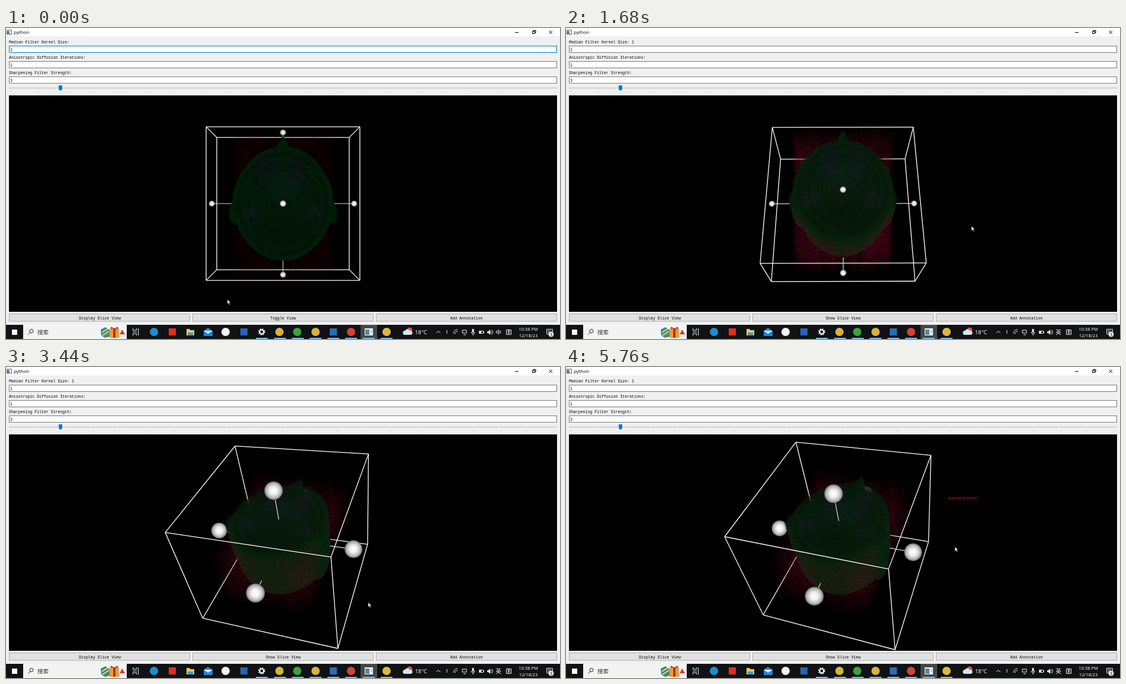
Animation of 936x526 px, one loop 5840 ms. Source, as an HTML page with a canvas:

```html
<!DOCTYPE html>
<html lang="zh">
<head>
<meta charset="utf-8">
<style>
html, body { margin: 0; width: 100%; height: 100%; overflow: hidden; background: #f0f0f0; }
svg, canvas { position: absolute; left: 0; top: 0; }
canvas { left: 5px; top: 114px; }
text { font-family: "Liberation Mono", monospace; font-size: 6.55px; fill: #000; white-space: pre; }
.ui { font-family: "Open Sans", "Noto Sans CJK SC", "Noto Sans CJK", sans-serif; }
.mid { text-anchor: middle; }
.light { fill: #fff; }
</style>
</head>
<body>
<svg width="936" height="526" viewBox="0 0 936 526">
  <rect width="936" height="526" fill="#f0f0f0"/>
  <rect width="936" height="14" fill="#fff"/>
  <rect x="1.5" y="3.5" width="8" height="7" fill="#fff" stroke="#667"/>
  <rect x="2" y="5" width="4" height="5" fill="#4a8a90"/>
  <g id="title">
    <text class="ui" x="13" y="10" style="font-size:8px;fill:inherit">python</text>
    <path d="M860 7.5h6M889.5 5.5h4v4h-4zM891 5.5v-1.500h4v4h-1.500M917.500 4.500l5.500 5.500M923 4.500l-5.500 5.500" fill="none" stroke="currentColor"/>
  </g>
  <text id="median" x="5" y="25.500"></text>
  <text x="5" y="51.500">Anisotropic Diffusion Iterations:</text>
  <text x="5" y="77.500">Sharpening Filter Strength:</text>
  <g fill="#fff" stroke="#7a7a7a">
    <rect id="field" x="5.500" y="30.500" width="925" height="11"/>
    <rect x="5.500" y="56.500" width="925" height="11"/>
    <rect x="5.500" y="82.500" width="925" height="11"/>
  </g>
  <text x="7" y="38.500">1</text><text x="7" y="64.500">1</text><text x="7" y="90.500">3</text>
  <path d="M5 101.500h926" stroke="#d2d2d2" stroke-width="2"/>
  <path id="ticks" stroke="#c4c4c4"/>
  <path d="M89 97h6v6.500l-3 3l-3-3z" fill="#0078d7"/>
  <g id="buttons"></g>
  <rect y="502" width="936" height="24" fill="#101214"/>
  <rect x="10" y="510" width="9" height="9" fill="#fff"/>
  <rect x="29" y="502" width="175" height="24" fill="#f3f3f3"/>
  <g fill="none" stroke="#222"><circle cx="43" cy="512.500" r="3"/><path d="M41 515l-3.500 3.500"/></g>
  <text class="ui" x="53" y="518" style="font-size:9.500px;fill:#333">搜索</text>
  <g>
    <path d="M160 510l8-4l7 5v11l-8 2l-6-4z" fill="#4b8b6a"/><path d="M162 515l11-7M163 520l11-7" stroke="#d8e6c8" stroke-width="1.500"/>
    <rect x="175" y="508" width="16" height="16" fill="#e0a13c"/><path d="M183 508v16" stroke="#b8302c" stroke-width="4"/>
    <path d="M183 508l-6-3v4zl6-3v4z" fill="#c43a32"/>
    <path d="M191 520l5-10l5 8v4h-10z" fill="#c83a3c"/><rect x="191" y="518" width="11" height="4" rx="2" fill="#dfe8f2"/>
  </g>
  <g fill="none" stroke="#eee"><path d="M214.500 508v3h6v-3M214.500 520v-3h6v3M214 514h7M223.500 508v12"/></g>
  <rect x="599" y="502" width="28" height="24" fill="#45484b"/>
  <g id="apps"></g>
  <g fill="none" stroke="#fff"><circle cx="432" cy="514" r="3.400" stroke-width="2"/><circle cx="432" cy="514" r="5" stroke-width="1.800" stroke-dasharray="1.960"/></g>
  <path d="M305 509h5l1 2h7v9h-13z" fill="#f5c64e"/><path d="M307 515h9v5h-9z" fill="#3b9ae0"/>
  <path d="M334 512l7-5l8 5v9h-15z" fill="#2484d8"/><path d="M334 512l7.500 5l7.500-5z" fill="#e9f4fc"/>
  <rect x="606" y="508" width="14" height="12" fill="#f1f5f7"/><rect x="607" y="510" width="7" height="9" fill="#4f8f98"/><path d="M616 512h3M616 515h3" stroke="#789"/>
  <path id="open" stroke="#76b9ed" stroke-width="2"/>
  <circle cx="682" cy="511" r="4.500" fill="#e2503c"/><path d="M674 519a3.500 3.500 0 0 1 0-7a4.500 4.500 0 0 1 8 0a3.500 3.500 0 0 1 2 7z" fill="#d4e5f7"/>
  <text class="ui light" x="691" y="517.500" style="font-size:9.300px">18°C</text>
  <g fill="none" stroke="#e8e8e8">
    <path d="M727 516l3.500-3.500l3.500 3.500M745 511v6M756 517a7 7 0 0 1 7-7M758.500 517.500a4.500 4.500 0 0 1 4.500-4.500M771 511h7v5h-7zM773 519h4M786 514a3 3 0 0 0 6 0M789 517v3M799.500 512.500h7v4h-7zM807.500 513.500v2"/>
    <path d="M818.500 512a3 3 0 0 1 0 5M820.500 510.500a5 5 0 0 1 0 8M845.500 510.500h8v8h-8zM847 513h5M849.500 511v6M847 516h5"/>
    <path d="M913.500 509.500h10v8h-4l-2 2v-2h-4zM915 512h6M915 514.500h5"/>
  </g>
  <path d="M787.500 509h3v6h-3zM813 513h2l3-3v9l-3-3h-2zM800 513h3v3h-3z" fill="#eee"/>
  <text id="lang" class="ui light mid" x="832" y="518" style="font-size:9.500px"></text>
  <text class="ui light mid" x="882.500" y="511.500" style="font-size:7.600px">10:38 PM</text>
  <text class="ui light mid" x="882.500" y="522.500" style="font-size:7.600px">12/18/23</text>
  <circle cx="921" cy="518" r="4.500" fill="#e6e6e6"/><text class="ui mid" x="921" y="520.500">3</text>
</svg>
<canvas id="view" width="926" height="366"></canvas>
<svg width="936" height="526" viewBox="0 0 936 526">
  <text id="note" x="645" y="224" style="font:italic 6.400px 'Liberation Sans',sans-serif;fill:#c01a10">Annotation Demo</text>
  <g id="dialog">
    <rect x="415" y="214" width="106.500" height="70" fill="#f0f0f0"/><rect x="415" y="214" width="106.500" height="18" fill="#fff"/>
    <rect x="419.500" y="219.500" width="8" height="7" fill="#fff" stroke="#667"/><rect x="420" y="221" width="4" height="5" fill="#4a8a90"/>
    <text class="ui" x="432" y="226" style="font-size:7.500px">Text In...</text>
    <text class="ui" x="477" y="226.500" style="font-size:8.500px">?</text>
    <path d="M504 220l6 6M510 220l-6 6" stroke="#222"/>
    <text x="421" y="244.500">Enter your annotation:</text>
    <rect x="421.500" y="249.500" width="93.500" height="11.500" fill="#fff" stroke="#0078d7"/>
    <text id="typed" x="422.500" y="257.500"></text><path id="caret" stroke="#000"/>
    <rect x="421.500" y="265.500" width="44" height="12" fill="#e1e1e1" stroke="#0078d7"/><text class="mid" x="443.500" y="274">OK</text>
    <rect x="470.500" y="265.500" width="44" height="12" fill="#e1e1e1" stroke="#adadad"/><text class="mid" x="492.500" y="274">Cancel</text>
  </g>
  <g id="ime">
    <rect x="435" y="259" width="408" height="27" fill="#d2d2d2"/><rect x="435" y="259" width="49" height="27" fill="#91c9f7"/>
    <rect x="813" y="259" width="30" height="27" fill="#dcdcdc"/>
    <g id="words"></g>
    <path d="M784.500 269l-4 4l4 4" fill="none" stroke="#999"/><path d="M802.500 269l4 4l-4 4" fill="none" stroke="#111"/>
    <g fill="none" stroke="#222"><circle cx="828" cy="273" r="4.800"/><path d="M825.500 274.500q2.500 2.500 5 0M826 271v1M830 271v1"/></g>
  </g>
  <path id="cursor" d="M0 0v8l1.900-1.700l1.300 2.900l1.300-.6l-1.300-2.800h2.500z" fill="#fff" stroke="#000" stroke-width=".6"/>
</svg>
<script>
const LOOP = 5840, STEP = 80, F = 683, H = .176, DEPTH = .0744;
const $ = id => document.getElementById(id);
const ctx = $('view').getContext('2d');
let seed = 7;
const rnd = () => (seed = (seed * 16807) % 2147483647) / 2147483647;

// static parts
$('ticks').setAttribute('d', Array.from({length: 21}, (_, i) => `M${Math.round(8 + i * 45.95) + .5} 107v2`).join(''));
$('open').setAttribute('d', [422, 453, 483, 513, 543, 573, 603, 633].map(x => `M${x} 525h20`).join(''));
$('buttons').innerHTML = ['Display Slice View', '', 'Add Annotation'].map((s, i) =>
  `<rect x="${5.5 + i * 310}" y="483.500" width="305" height="12.500"/><text class="mid" x="${158.5 + i * 309.7}" y="492.500">${s}</text>`).join('');
const btnRects = [...$('buttons').querySelectorAll('rect')];
const toggle = $('buttons').querySelectorAll('text')[1];
const dot = (x, c) => `<circle cx="${x}" cy="514" r="7" fill="${c}"/>`;
const box = (x, c) => `<rect x="${x - 6}" y="508" width="12" height="12" fill="${c}"/>`;
$('apps').innerHTML = dot(250, '#1c8fd0') + box(281, '#e0301e') + dot(371, '#f4f4f4') + box(402, '#2a62b8') +
  dot(462, '#d8b23c') + dot(492, '#3aa33f') + dot(523, '#d8b23c') + box(553, '#2b6cb5') + dot(583, '#d0433a') + dot(643, '#e0b83a');
$('words').innerHTML = ['那你', '奶女', '娜娜', '尿尿', '您能', '你能', '男女'].map((w, i) =>
  `<text class="ui" x="${443 + i * 48.2}" y="277" style="font-size:11.500px;fill:#444">${i + 1}</text>` +
  `<text class="ui" x="${454.5 + i * 48.2}" y="277" style="font-size:11.500px">${w}</text>`).join('');

function texture(w, h, shade) {
  const c = document.createElement('canvas');
  c.width = w; c.height = h;
  const g = c.getContext('2d'), im = g.createImageData(w, h);
  for (let y = 0; y < h; y++) for (let x = 0; x < w; x++) {
    const p = shade(x, y);
    if (p) im.data.set(p, (y * w + x) * 4);
  }
  g.putImageData(im, 0, 0);
  return c;
}

// volume layers: model space x ±.125, y ±.18
const TW = 128, TH = 184, EX = .125, EY = .18;
const spot = (x, y, cx, cy, rx, ry) => Math.exp(-(((x - cx) / rx) ** 2) - ((y - cy) / ry) ** 2);
const model = f => (px, py) => f(((px + .5) / TW * 2 - 1) * EX, (1 - (py + .5) / TH * 2) * EY);
const inEar = (x, y) => Math.hypot((Math.abs(x) - .114) / .011, (y + .022) / .024) < 1;
function headRadius(x, y) {
  const nose = y > .1 && y < .154 && Math.abs(x) < (.157 - y) * .6;
  const e = Math.hypot(x / (.117 - (y < 0 ? -y * .05 : y * .04)), y / .132);
  return nose || inEar(x, y) ? Math.min(e, .93) : e;
}
function green(cap) {
  return model((x, y) => {
    const e = headRadius(x, y);
    if (e > 1 || rnd() < .15) return;
    const a = Math.abs(x), n = .45 + rnd() * 1.1, rim = e > .9 ? 1.1 : 1;
    let r = 6, g = 31, b = 11;
    if (cap) {
      const eye = spot(a, y, .035, .075, .022, .035), ear = spot(a, y, .072, -.022, .022, .018);
      const mid = spot(x, y, 0, .035, .045, .04), hole = spot(x, y, 0, -.065, .055, .035);
      const k = rnd();
      r += k * (18 * eye + 26 * ear + 8 * mid) - 3;
      g += 10 * k * mid - 4 * hole - 5 * eye - 5;
      b += k * (28 * eye + 24 * ear + 20 * mid) - 2;
      g += 3 * Math.sin(e * 34) * (e > .65 ? 1 : .3);
    }
    return [r * n * rim, g * n * rim, b * n * rim, 100];
  });
}
const red = model((x, y) => {
  if (Math.abs(x) > .121 || Math.abs(y) > .171) return;
  const blot = .7 + .3 * Math.sin(x * 90 + 2 * Math.sin(y * 55)) * Math.sin(y * 70 + x * 40);
  const edge = Math.min(1, (.125 - Math.abs(x)) / .012, (.176 - Math.abs(y)) / .02);
  return rnd() < .12 * blot * edge ? [108, 8, 30, 32] : null;
});
const many = (n, f) => Array.from({length: n}, f);
const bodies = many(8, () => texture(TW, TH, green(false)));
const caps = many(5, () => texture(TW, TH, green(true)));
const hazes = many(12, () => texture(TW, TH, red));

const slice = texture(174, 246, (x, y) => {
  const k = Math.hypot((x - 90.5) / 82, (y - 120) / 100);
  let v = 0;
  if (k > 1) {
    const p = .42 * Math.min(1, Math.max(0, k - 1.03) / .3) * (.75 + .25 * Math.sin(k * 55));
    v = rnd() < p ? 90 + rnd() * 150 : 0;
  } else if (k > .968) v = 255;
  else if (k > .945) v = rnd() < .2 ? 200 : 10;
  else if (k > .9) v = 255;
  else if (k > .868) v = rnd() < .15 ? 160 : 8;
  else {
    const p = .3 * (spot(x, y, 52, 80, 9, 13) + spot(x, y, 140, 104, 5, 22) + spot(x, y, 64, 128, 12, 12)) +
      .35 * (spot(x, y, 92, 152, 12, 7) + spot(x, y, 122, 157, 5, 7) + spot(x, y, 90, 176, 2, 6)) + .004;
    const notch = Math.abs(x - 92) < (44 - y) * .4 || (Math.abs(x - 84) < (y - 200) * .3);
    v = notch || rnd() < p ? 20 : 255;
  }
  return [v, v, v, 255];
});

// keyframes
function at(keys, t) {
  let i = 0;
  while (i < keys.length - 2 && t >= keys[i + 1][0]) i++;
  const a = keys[i], b = keys[i + 1];
  let k = Math.min(1, Math.max(0, (t - a[0]) / (b[0] - a[0])));
  k = k * k * (3 - 2 * k);
  return a.slice(1).map((v, j) => v + (b[j + 1] - v) * k);
}
// time, x axis, z axis, front reach, back reach
const flat = [1, 0, 0, 0, 0, 1], tip = [.998, .049, .06, -.061, .97, .224];
const low = [.99, .09, .066, -.063, .93, -.33], turn = [.926, -.167, .333, -.133, .688, .721];
const poses = [
  [0, ...flat, DEPTH, DEPTH], [1360, ...flat, DEPTH, DEPTH],
  [1680, 1, .003, 0, 0, .434, .901, DEPTH, DEPTH],
  [2080, ...tip, DEPTH, DEPTH], [2160, ...tip, DEPTH, DEPTH], [2400, ...tip, .158, DEPTH],
  [2520, ...tip, .158, DEPTH], [2720, ...tip, .16, .135],
  [3040, ...low, .16, .135], [3520, ...turn, .157, .135], [LOOP, ...turn, .157, .135]
];
const moves = [
  [0, 374, 459], [160, 374, 459], [480, 262, 490], [640, 262, 490], [960, 470, 490], [1120, 470, 490],
  [1360, 686, 262], [1680, 685, 335], [2000, 684, 430], [2160, 463, 247], [2400, 461, 187], [2480, 476, 384],
  [2720, 474, 424], [2800, 680, 420], [3040, 690, 319], [3480, 610, 400], [3680, 777, 490], [3840, 777, 490],
  [4000, 639, 294], [4960, 639, 294], [5200, 657, 304], [LOOP, 657, 304]
];

// vectors
const dotp = (a, b) => a[0] * b[0] + a[1] * b[1] + a[2] * b[2];
const unit = a => a.map(v => v / Math.hypot(...a));
const cross = (a, b) => [a[1] * b[2] - a[2] * b[1], a[2] * b[0] - a[0] * b[2], a[0] * b[1] - a[1] * b[0]];
const proj = p => [468 + F * p[0] / (1 - p[2]), 297 - F * p[1] / (1 - p[2])];

function line(a, b, w) {
  ctx.lineWidth = w;
  ctx.beginPath();
  ctx.moveTo(...proj(a));
  ctx.lineTo(...proj(b));
  ctx.stroke();
}
function ball(p, size) {
  const [x, y] = proj(p), r = size / (1 - p[2]);
  const g = ctx.createRadialGradient(x, y, 0, x, y, r);
  g.addColorStop(0, '#fff');
  g.addColorStop(.4, '#f0f0f0');
  g.addColorStop(.8, '#b4b4b4');
  g.addColorStop(1, '#686868');
  ctx.fillStyle = g;
  ctx.beginPath();
  ctx.arc(x, y, r, 0, 7);
  ctx.fill();
}

function drawVolume(Z, place, haze) {
  const n = 48;
  for (let j = 0; j < n; j++) {
    const i = Z[2] < 0 ? n - 1 - j : j, u = i / (n - 1) * 2 - 1, z = u * DEPTH;
    const c = proj(place(0, 0, z)), ax = proj(place(.01, 0, z)), ay = proj(place(0, .01, z));
    const d = (a, k) => (a[k] - c[k]) * 100;
    ctx.save();
    ctx.transform(d(ax, 0), d(ax, 1), d(ay, 0), d(ay, 1), c[0], c[1]);
    ctx.scale(1, -1);
    const put = (img, s) => ctx.drawImage(img, -EX * s, -EY * s, EX * 2 * s, EY * 2 * s);
    ctx.globalAlpha = haze;
    put(hazes[i % 12], 1);
    ctx.globalAlpha = 1;
    // the crown rounds off at the far end
    put(i >= n - 5 ? caps[n - 1 - i] : bodies[i % 8], 1 - .14 * Math.max(0, -u) ** 3);
    ctx.restore();
  }
}

function drawScene(t) {
  const k = at(poses, t), Z = unit(k.slice(3, 6)), x0 = k.slice(0, 3), q = dotp(x0, Z);
  const X = unit(x0.map((v, i) => v - q * Z[i])), Y = cross(Z, X), zf = k[6], zb = k[7];
  const place = (x, y, z) => [0, 1, 2].map(i => X[i] * x + Y[i] * y + Z[i] * z);
  const reach = [[H, H], [H, H], [zb, zf]], axes = [X, Y, Z];
  const inner = [[.12, .12], [.139, .157], [DEPTH, DEPTH]];
  // handles on the side faces stay at the middle of the box depth
  const along = (a, s, d) => axes[a].map((v, i) => v * (s ? d : -d) + (a < 2 ? Z[i] * (zf - zb) / 2 : 0));
  const faces = [];
  for (let a = 0; a < 3; a++) for (let s = 0; s < 2; s++) {
    const c = along(a, s, reach[a][s]), nrm = axes[a].map(v => s ? v : -v);
    const front = dotp(nrm, [-c[0], -c[1], 1 - c[2]]) > 0;
    faces.push({c, front, stop: along(a, s, front ? inner[a][s] : 0)});
  }
  const corner = b => place(...[0, 1, 2].map(i => b[i] ? reach[i][1] : -reach[i][0]));
  const edges = [];
  for (let a = 0; a < 3; a++) for (let m = 0; m < 4; m++) {
    const u = (a + 1) % 3, v = (a + 2) % 3, b = [0, 0, 0];
    b[u] = m & 1; b[v] = m >> 1;
    const p = corner(b), front = faces[u * 2 + b[u]].front || faces[v * 2 + b[v]].front;
    b[a] = 1;
    edges.push({p, q: corner(b), front});
  }
  const size = t >= 2160 ? 14 : 5;
  const half = front => {
    ctx.strokeStyle = '#fff';
    edges.filter(e => e.front === front).forEach(e => line(e.p, e.q, 1.3));
    const fs = faces.filter(f => f.front === front).sort((a, b) => a.c[2] - b.c[2]);
    ctx.strokeStyle = '#ddd';
    fs.forEach(f => line(f.c, f.stop, 1.2));
    fs.forEach(f => ball(f.c, size));
  };
  ctx.setTransform(1, 0, 0, 1, 0, 0);
  ctx.fillStyle = '#000';
  ctx.fillRect(0, 0, 926, 366);
  ctx.translate(-5, -114);
  half(false);
  drawVolume(Z, place, t < 240 ? .5 : 1);
  half(true);
  if (t >= 480 && t < 1040) ctx.drawImage(slice, 43, 232);
}

const show = (id, on) => $(id).style.display = on ? '' : 'none';
function drawUi(t) {
  const modal = t >= 3760 && t < 4960, [x, y] = at(moves, t);
  $('title').style.fill = $('title').style.color = modal ? '#999' : '#000';
  $('median').textContent = 'Median Filter Kernel Size:' + (t < 240 ? '' : ' 1');
  $('field').setAttribute('stroke', t < 480 ? '#0078d7' : '#7a7a7a');
  toggle.textContent = t < 1040 ? 'Toggle View' : 'Show Slice View';
  btnRects.forEach((r, i) => {
    const over = !modal && y > 483 && y < 497 && x > 5 + i * 310 && x < 311 + i * 310;
    r.setAttribute('fill', over ? '#e5f1fb' : '#e1e1e1');
    r.setAttribute('stroke', over ? '#6fb1e4' : '#adadad');
  });
  $('lang').textContent = t < 160 || (t >= 3840 && t < 4320) ? '中' : '英';
  show('dialog', modal);
  show('ime', t >= 3920 && t < 4320);
  show('note', t >= 4960);
  const s = t < 3840 ? '' : t < 3920 ? 'A' : t < 4000 ? 'An' : t < 4320 ? "An'n" :
    'Annotation Demo'.slice(0, 3 + Math.floor((t - 4320) / 40));
  $('typed').textContent = s;
  $('caret').setAttribute('d', `M${423 + s.length * 3.93} 251.500v7.500`);
  $('cursor').setAttribute('transform', `translate(${x} ${y})`);
}

let last = -1;
function tick() {
  const t = Math.floor(performance.now() % LOOP / STEP) * STEP;
  if (t !== last) {
    last = t;
    drawScene(t);
    drawUi(t);
  }
  requestAnimationFrame(tick);
}
tick();
</script>
</body>
</html>
```
